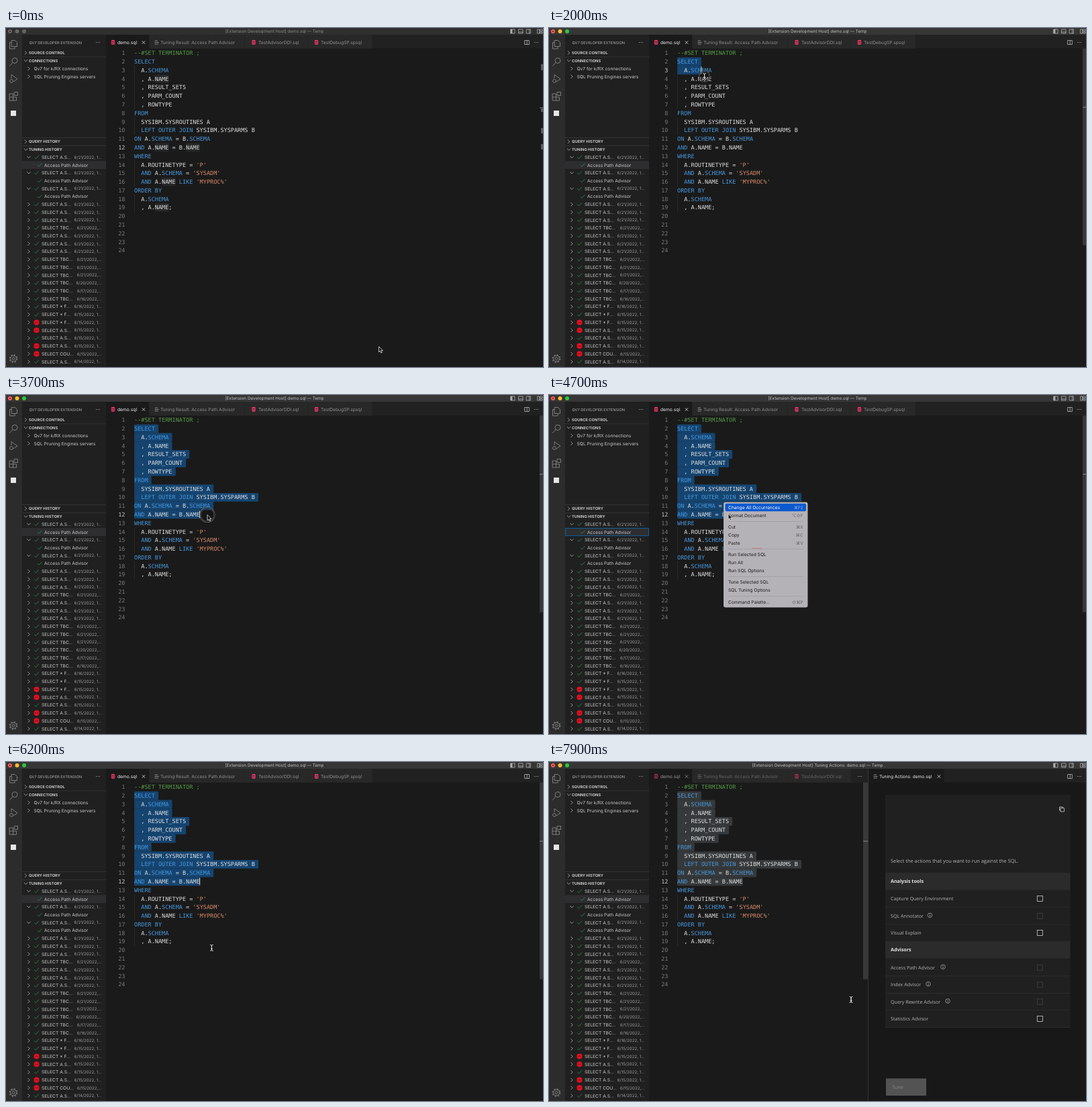
Recreate the animation shown at these times as an HTML page. Size 800x505 px, loop 8 s.

```html
<!DOCTYPE html>
<html lang="en">
<head>
<meta charset="utf-8">
<title>Tuning a selected query</title>
<style>
  html, body { margin: 0; width: 100%; height: 100%; overflow: hidden; background: #1a1a1a; }
  svg { display: block; width: 800px; height: 505px; }
  text { font-family: Inter, "Liberation Sans", sans-serif; white-space: pre; text-rendering: geometricPrecision; }
  .mono { font-family: "DejaVu Sans Mono", "Liberation Mono", monospace; }
  .sans { font-family: "Open Sans", "Noto Sans", sans-serif; }
  .keys { font-family: Inter, "DejaVu Sans", sans-serif; }
  .bold { font-weight: 700; }
  .line { fill: none; stroke-linecap: round; stroke-linejoin: round; }
</style>
</head>
<body>
<svg id="stage" viewBox="0 0 800 505"></svg>
<script>
const LOOP = 8000, LEFT = 191, CHAR = 5.14, STEP = 12.78, FIRST = 37.3;
const KEYWORD = '#4798dc', PLAIN = '#dedede', STRING = '#d98a6a', COMMENT = '#559a45';

const rect = (x, y, w, h, fill, more = '') =>
  `<rect x="${x}" y="${y}" width="${w}" height="${h}" fill="${fill}" ${more}/>`;
const label = (x, y, s, size, fill, more = '') =>
  `<text x="${x}" y="${y + size * .36}" font-size="${size}" fill="${fill}" ${more}>${s}</text>`;
const line = (d, color, width = 1, more = '') =>
  `<path class="line" d="${d}" stroke="${color}" stroke-width="${width}" ${more}/>`;
const circle = (x, y, r, more) => `<circle cx="${x}" cy="${y}" r="${r}" ${more}/>`;
const group = (id, body) => `<g id="${id}">${body}</g>`;
const chevron = (x, y, open) =>
  line(open ? `M${x - 2.4} ${y - 1.2}l2.4 2.4l2.4-2.4` : `M${x - 1.2} ${y - 2.4}l2.4 2.4l-2.4 2.4`, '#b5b5b5', .8);
const tick = (x, y) => line(`M${x - 3} ${y + .3}l2 2l4.2-4.6`, '#2c9048', .8);
const cross = (x, y, c) => line(`M${x - 2} ${y - 2}l4 4m0-4l-4 4`, c, .8);
const dots = (x, y) => [-2.4, 0, 2.4].map(d => circle(x + d, y, .6, 'fill="#b5b5b5"')).join('');

const code = `--#SET TERMINATOR ;
SELECT
  A.SCHEMA
  , A.NAME
  , RESULT_SETS
  , PARM_COUNT
  , ROWTYPE
FROM
  SYSIBM.SYSROUTINES A
  LEFT OUTER JOIN SYSIBM.SYSPARMS B
ON A.SCHEMA = B.SCHEMA
AND A.NAME = B.NAME
WHERE
  A.ROUTINETYPE = 'P'
  AND A.SCHEMA = 'SYSADM'
  AND A.NAME LIKE 'MYPROC%'
ORDER BY
  A.SCHEMA
  , A.NAME;`.split('\n');
const lineY = n => FIRST + (n - 1) * STEP;

function paint(s, n) {
  if (n === 1) return `<tspan fill="#8a9a86">--</tspan><tspan fill="${COMMENT}">${s.slice(2)}</tspan>`;
  return s.replace(/'[^']*'|\b(SELECT|SCHEMA|FROM|LEFT|OUTER|JOIN|ON|AND|WHERE|LIKE|ORDER|BY)\b/g,
    w => `<tspan fill="${w[0] === "'" ? STRING : KEYWORD}">${w}</tspan>`);
}

function codeText() {
  return code.map((s, i) => {
    const indent = s.search(/\S/);
    const guide = indent ? line(`M${LEFT + .5} ${lineY(i + 1) - 6.4}v${STEP}`, '#343434', .6) : '';
    return guide + label(LEFT + indent * CHAR, lineY(i + 1), paint(s.trim(), i + 1), 8.54, PLAIN, 'class="mono"');
  }).join('');
}

function wordMarks() {
  return code.map((s, i) => [...s.matchAll(/\bNAME\b/g)].map(m =>
    rect(LEFT + m.index * CHAR, lineY(i + 1) - 6.2, 4 * CHAR, 12.4, '#262728')).join('')).join('');
}

function lineNumbers() {
  let out = '';
  for (let n = 1; n <= 24; n++)
    out += label(177.5, lineY(n), n, 8.54, '#777', `class="mono" text-anchor="end" id="n${n}"`);
  return out;
}

const database = x =>
  `<ellipse cx="${x}" cy="19" rx="2.9" ry="1.3" fill="#e0355f"/>` +
  [20, 22.2].map(y => `<path d="M${x - 2.9} ${y}q2.9 2 5.8 0v1.7q-2.9 2-5.8 0z" fill="#e0355f"/>`).join('');
const listIcon = (x, y) => line(`M${x} ${y - 2.4}h3.6M${x} ${y}h5.2M${x} ${y + 2.4}h4.4`, '#a5a5a5', .8);
const splitIcon = line('M773 18.5h6.4v6h-6.4zM776.2 18.5v6', '#b8b8b8', .8) + dots(790, 21.5);

function tabs() {
  return rect(149, 10, 651, 20.6, '#212122') +
    rect(149, 10, 64, 20.6, '#1a1a1a') +
    [[213.5, 142], [356, 93], [449.5, 96]].map(([x, w]) => rect(x, 10, w, 20.6, '#282828')).join('') +
    splitIcon +
    group('tabLabels', database(159.5) + label(166, 21.5, 'demo.sql', 6.7, '#f0f0f0') + cross(205, 21.5, '#ddd') +
      listIcon(222, 21.5) + label(230, 21.5, 'Tuning Result: Access Path Advisor', 6.65, '#909090') +
      database(369) + label(376, 21.5, 'TestAdvisorDDI.sql', 6.7, '#909090') +
      database(462.5) + label(469, 21.5, 'TestDebugSP.spsql', 6.65, '#909090'));
}

function titleBar() {
  const icons = line('M752 2h6v6h-6zM764 2h6v6h-6zM764 6h6M775.5 2h6v6h-6zM779.5 2v6M792 2h2.6v6h-2.6zM796 2h3v2.5h-3zM796 6h3v2h-3z', '#b0b0b0', .8) +
    rect(752, 2, 2.4, 6, '#b0b0b0');
  return rect(0, 0, 800, 10, '#2f2f2f', 'id="bar"') +
    [6, 16.5, 27].map(x => circle(x, 5, 3, 'class="light" fill="#666"')).join('') +
    circle(6, 5, 1, 'fill="#5a1512"') +
    label(400, 5, '', 6.35, '#8d8d8d', 'id="title" text-anchor="middle"') + icons;
}

function activityBar() {
  const gray = '#7d7d7d';
  return rect(0, 10, 24, 495, '#2c2c2c') +
    line('M8.5 18.5h5l3 3v6h-8zM8.5 21.5h-3v9.5h7.5v-3', gray) +
    circle(13, 48.5, 4, `fill="none" stroke="${gray}"`) + line('M10 51.5l-4.5 5', gray) +
    line('M8 74.5v-5l9 6.5l-6 4', gray) + circle(8, 79, 2.4, `fill="none" stroke="${gray}"`) +
    line('M5.5 98h5v5h5v5h-10zM5.5 103h5v5M12.5 95.5h5v5h-5z', gray) +
    rect(7, 123, 8, 8, '#e6e6e6') +
    circle(11, 492.5, 1.8, `fill="none" stroke="${gray}"`) + circle(11, 492.5, 4.4, `fill="none" stroke="${gray}"`) +
    circle(11, 492.5, 5.6, `fill="none" stroke="${gray}" stroke-width="1.4" stroke-dasharray="2.2 2.2"`);
}

// Each entry: query start, day in June, state (o open, r failed)
const entries = ('A.S 21 o|A.S 21 o|A.S 21 o|A.S 21|A.S 21|A.S 21|TBC 21|A.S 21|A.S 21|A.S 21|TBC 21|TBC 21|TBC 21|' +
  'TBC 20|TBC 17|TBC 16|*_F 16|*_F 15|*_F 15 r|A.S 15 r|A.S 15|A.S 15 r|COU 15 r|A.S 14').split('|');

function historyRows() {
  let y = 192.4, out = '';
  for (const entry of entries) {
    const [what, day, state] = entry.split(' ');
    const short = /TBC|COU/.test(what);
    out += chevron(34, y, state === 'o') +
      (state === 'r' ? circle(45.5, y, 4.1, 'fill="#e0101e"') + line(`M43.3 ${y}h1.6m1.2 0h1.6`, '#a00c18', 1.2) : tick(45.5, y)) +
      label(53, y, `SELECT ${what.replace('_', ' ')}...`, 6.7, '#cacaca') +
      label(142.5, y, `6/${day}/2022,${short ? '' : ' 1'}...`, 6.15, '#9c9c9c', 'text-anchor="end"');
    y += 11.72;
    if (state === 'o') {
      out += tick(50, y) + label(57, y, 'Access Path Advisor', 6.7, '#cacaca');
      y += 11.72;
    }
  }
  return out;
}

function sideBar() {
  const section = (y, s, open) => chevron(29.5, y, open) + label(34, y, s, 5.75, '#c8c8c8', 'class="bold"');
  const rule = y => rect(24, y, 125, .7, '#3a3a3a');
  return rect(24, 10, 125, 495, '#202021') +
    label(34.5, 21.5, 'QV7 DEVELOPER EXTENSION', 5.6, '#b0b0b0') + dots(137, 21.5) +
    section(37, 'SOURCE CONTROL') + rule(42.6) + section(48.7, 'CONNECTIONS', true) +
    chevron(34, 60.5) + label(41.5, 60.5, 'Qv7 for k/RX connections', 6.7, '#cacaca') +
    chevron(34, 72.3) + label(41.5, 72.3, 'SQL Pruning Engines servers', 6.7, '#cacaca') +
    rule(163) + section(169.2, 'QUERY HISTORY') + rule(175) + section(181, 'TUNING HISTORY', true) +
    rect(24, 198.3, 125, 11.7, '#2e2e31') +
    group('rowFocus', rect(24.4, 198.6, 124.2, 11.1, 'none', 'stroke="#0b6cb5" stroke-width=".8"')) +
    historyRows();
}

const slider = (x, w) => rect(x, 30.6, w, 293, '#383838') + rect(x, 117.5, w, 1, '#8a8a8a');
const idleMarks = rect(795, 118, 5, 1.5, '#5c5c5c') +
  [[54, 9], [120, 5], [149, 8], [173, 8]].map(([y, h]) => rect(797, y, 3, h, '#5c5c5c')).join('');

const menuItems = [
  [167.5, 'Change All Occurrences', '⌘F2'], [179.3, 'Format Document', '⌥⇧F'],
  [197, 'Cut', '⌘X'], [208.7, 'Copy', '⌘C'], [220.4, 'Paste', '⌘V'],
  [238, 'Run Selected SQL'], [249.7, 'Run All'], [261.4, 'Run SQL Options'],
  [279, 'Tune Selected SQL'], [290.7, 'SQL Tuning Options'], [308.3, 'Command Palette...', '⇧⌘P']];

function menu() {
  return rect(259.5, 159, 126.5, 158, '#000', 'rx="3.5" opacity=".5"') +
    rect(260, 159.5, 125.5, 157, '#b5b2b7', 'rx="3"') +
    [188.3, 229.2, 270.2, 299.5].map(y => rect(267, y, 112, .7, '#9c999f')).join('') +
    line('M304 228.3h14', '#d0444c', .8, 'stroke-dasharray="0.8 2"') +
    rect(262.5, 0, 120.5, 11.6, '#0c59cf', 'rx="2" id="hover"') +
    menuItems.map(([y, s, keys = '']) => `<g class="item">${label(267, y, s, 6.7, 'currentColor')}` +
      label(378.5, y, keys, 6.3, 'currentColor', 'class="keys" text-anchor="end" opacity=".55"') + '</g>').join('');
}

function panel() {
  const head = (y, s) => rect(501, y, 275.5, 25.5, '#2b2b2b') + label(509, y + 12.8, s, 7.15, '#e6e6e6', 'class="sans bold"');
  const row = (y, s, on, info) => rect(501, y + 12.3, 275.5, .7, '#303030') +
    label(509, y, s, 7.15, '#b4b4b4', 'class="sans"') +
    rect(727.3, y - 4, 8, 8, 'none', `stroke="${on ? '#d8d8d8' : '#454545'}" stroke-width=".75"`) +
    (info ? circle(info, y - 1, 3.3, 'fill="none" stroke="#b4b4b4" stroke-width=".7"') +
      line(`M${info} ${y - 1.2}v2M${info} ${y - 2.7}v.1`, '#b4b4b4', .8) : '');
  return rect(449.5, 10, 26, 20.6, '#212122') + dots(463, 21.5) + slider(468, 7) +
    rect(475, 10, 325, 495, '#181818') + rect(475, 10, 325, 20.6, '#212122') + rect(476, 10, 112.5, 20.6, '#1a1a1a') +
    rect(475, 10, .8, 495, '#3c3c3c') + listIcon(484, 21.5) +
    label(492, 21.5, 'Tuning Actions: demo.sql', 6.55, '#f0f0f0') + cross(581, 21.5, '#ddd') + splitIcon +
    group('actions', rect(501, 49, 275.5, 347, '#202020') +
      line('M762 72h-1.5v-5h5v1.5M762.3 68.7h5.2v5.2h-5.2z', '#cfcfcf', .8) +
      label(509, 147.5, 'Select the actions that you want to run against the SQL.', 7.42, '#b4b4b4', 'class="sans"') +
      head(165, 'Analysis tools') + row(203.5, 'Capture Query Environment', true) +
      row(229.3, 'SQL Annotator', false, 567.5) + row(254.5, 'Visual Explain', true) +
      head(267, 'Advisors') + row(306.2, 'Access Path Advisor', false, 587) +
      row(331.7, 'Index Advisor', false, 565) + row(357, 'Query Rewrite Advisor', false, 594) +
      row(382.5, 'Statistics Advisor', true) +
      rect(502, 471.5, 60, 25.5, '#535353') + label(511, 484.5, 'Tune', 7.3, '#858585', 'class="sans"'));
}

const beamPath = 'M-2-4.5q2 0 2 1.5v6q0 1.5-2 1.5M2-4.5q-2 0-2 1.5v6q0 1.5 2 1.5M-1 1.5h2';
const pointer = group('ring', circle(0, 0, 10.5, 'fill="#000" fill-opacity=".15" stroke="#b0b0b0" stroke-width="2" stroke-opacity=".6"') +
    circle(0, 0, 10.5, 'fill="none" stroke="#0a0a0a" stroke-width="1"')) +
  group('arrow', '<path d="M0 0v8.2l1.9-1.7l1.3 3l1.5-.7l-1.3-2.9h2.5z" fill="#050505" stroke="#eee" stroke-width=".8"/>') +
  group('beam', line(beamPath, '#111', 2) + line(beamPath, '#e4e4e4', 1));

const stage = document.getElementById('stage');
stage.innerHTML = rect(0, 0, 800, 505, '#1a1a1a') + tabs() + titleBar() + activityBar() + sideBar() +
  group('idle', wordMarks() + idleMarks) + group('slider', slider(795, 5)) + group('selection', '') +
  lineNumbers() + codeText() + rect(0, 0, 1, 11, '#ddd', 'id="caret"') +
  group('panel', panel()) + group('menu', menu()) + group('pointer', pointer);

const el = id => document.getElementById(id);
const show = (id, on) => { el(id).style.display = on ? '' : 'none'; };
const within = (t, a, b) => t >= a && t < b;

// Pointer path: time, x, y
const path = [
  [0, 555.5, 474.5], [300, 555.5, 474.5], [1000, 192, 50], [1500, 192, 50], [1900, 227, 63], [2000, 231.5, 72],
  [3300, 300, 178.5], [3850, 300, 178.5], [4200, 260, 159.5], [4500, 260, 159.5], [4600, 264, 167],
  [4700, 267, 177], [5300, 306, 276], [6400, 306.5, 277], [7100, 450, 354], [LOOP, 450, 354]];

function place(t) {
  const i = Math.max(1, path.findIndex(p => p[0] > t));
  const [a, ax, ay] = path[i - 1], [b, bx, by] = path[i];
  const k = (t - a) / (b - a);
  return [ax + (bx - ax) * k, ay + (by - ay) * k];
}

// End of the selection trails the pointer slightly
function selectionEnd(t) {
  if (t < 1150) return [12, 0];
  const [x, y] = place(Math.min(t, 3700) - 100);
  const n = Math.max(2, Math.min(12, Math.round((y - FIRST) / STEP) + 1));
  return [n, Math.max(0, Math.min(code[n - 1].length, Math.round((x - LEFT) / CHAR)))];
}

function selectionBoxes(last, col, fill) {
  let out = '';
  for (let n = 2; n <= last; n++) {
    const chars = n === last ? col : code[n - 1].length + 1;
    if (chars) out += rect(LEFT, lineY(n) - 6.4, chars * CHAR, STEP + .1, fill, 'rx="1.5"');
  }
  return out;
}

function draw(t) {
  const focused = t >= 1150, split = t >= 7400, menuOpen = within(t, 4500, 5700);
  const [x, y] = place(t), [row, col] = selectionEnd(t);

  el('bar').setAttribute('fill', focused ? '#363636' : '#2f2f2f');
  el('title').setAttribute('fill', focused ? '#c4c4c4' : '#8d8d8d');
  el('title').textContent = `[Extension Development Host] ${split ? 'Tuning Actions: ' : ''}demo.sql — Temp`;
  document.querySelectorAll('.light').forEach((c, i) =>
    c.setAttribute('fill', focused ? ['#ff5f57', '#febc2e', '#28c840'][i] : '#666'));

  show('idle', !focused);
  show('slider', focused);
  el('selection').innerHTML = focused ? selectionBoxes(row, col, split ? '#36393b' : '#154470') : '';
  for (let n = 1; n <= 24; n++) el('n' + n).setAttribute('fill', n === row ? '#c6c6c6' : '#777');

  show('caret', within(t, 1150, 4500) || (within(t, 5700, 7400) && Math.floor(t / 500) % 2 === 0));
  el('caret').setAttribute('x', LEFT + col * CHAR - .5);
  el('caret').setAttribute('y', lineY(row) - 5.5);

  show('rowFocus', menuOpen);
  show('menu', menuOpen);
  const hoverY = place(Math.max(0, t - 100))[1];
  const hot = menuItems.findIndex(m => Math.abs(m[0] - hoverY) <= 5.9);
  show('hover', hot >= 0);
  if (hot >= 0) el('hover').setAttribute('y', menuItems[hot][0] - 5.8);
  document.querySelectorAll('.item').forEach((g, i) => { g.style.color = i === hot ? '#fff' : '#1c1b1d'; });

  show('panel', split);
  show('actions', t >= 7700);
  el('tabLabels').setAttribute('opacity', split ? .6 : 1);

  const beam = within(t, 1000, 3300) || t >= 5800;
  show('beam', beam);
  show('arrow', !beam);
  show('ring', within(t, 1150, 3800) || within(t, 4250, 4450) || within(t, 5400, 5650));
  el('ring').setAttribute('transform', `scale(${beam ? .76 : 1})`);
  el('pointer').setAttribute('transform', `translate(${x} ${y})`);
}

const start = performance.now();
function animate() {
  draw((performance.now() - start) % LOOP);
  requestAnimationFrame(animate);
}
animate();
</script>
</body>
</html>
```
